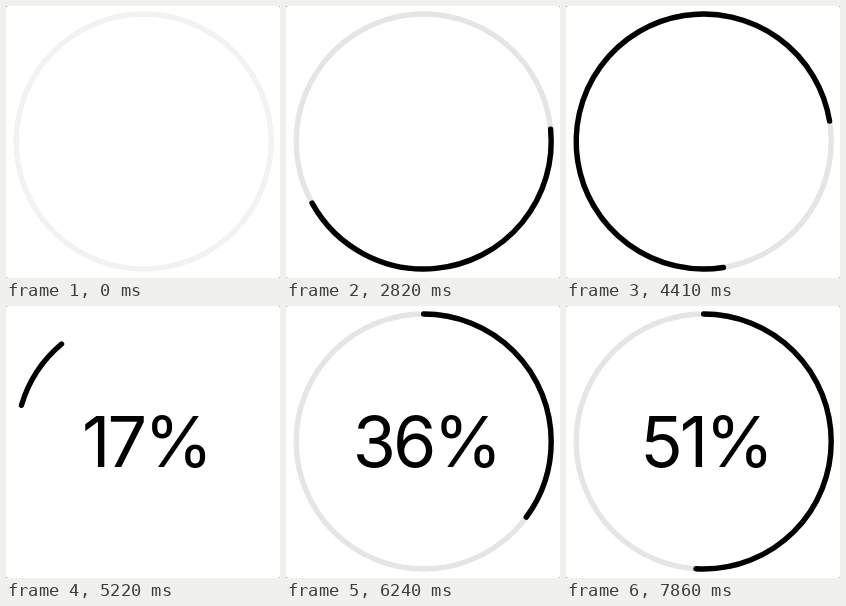
An HTML page that plays this animation: 274 px wide and 272 px high, repeating every 8 s.

```html
<!DOCTYPE html>
<html lang="en">
<head>
<meta charset="utf-8">
<title>Progress ring</title>
<style>
  html, body { margin: 0; width: 100%; height: 100%; overflow: hidden; background: #aaa; }
  svg { display: block; width: 274px; height: 272px; }
  circle { fill: none; stroke-width: 5.4; stroke-linecap: round; }
  text { font: 380 70px Inter, Roboto, sans-serif; letter-spacing: -3px; text-anchor: middle; }
</style>
</head>
<body>
<svg viewBox="0 0 274 272">
  <rect width="274" height="272" rx="2.5" fill="#fff"/>
  <circle id="track" cx="137.7" cy="135.5" r="127.5"/>
  <circle id="arc" cx="137.7" cy="135.5" r="127.5" stroke="#000" pathLength="360"/>
  <text id="label" x="140" y="161"></text>
</svg>
<script>
  const LOOP = 8000, SPIN_START = 1270, SPIN_END = 5370, COUNT_START = 4626;
  const [track, arc, label] = ["track", "arc", "label"].map(id => document.getElementById(id));

  const clamp = x => Math.min(1, Math.max(0, x));
  const mix = (a, b, k) => a + (b - a) * k;
  // Rises from 0 at `start` towards `limit`, ever more slowly.
  const settle = (t, start, limit, tau) => limit * (1 - Math.exp(-(t - start) / tau));
  const fill = t => 3.6 * settle(t, 5310, 54, 886);

  // Turning poses: [ms, start angle, sweep], in degrees clockwise from the top.
  const poses = [
    [SPIN_START, 0, 0], [1740, 185, 110], [2820, 804, 156.5],
    [4410, 1610.5, 270], [5220, 2086, 33.5], [SPIN_END, 2160, fill(SPIN_END)]
  ];

  function arcAt(t) {
    if (t >= SPIN_END) return [0, fill(t)];
    const i = poses.findIndex(p => p[0] > t);
    const [t0, ...a] = poses[i - 1], [t1, ...b] = poses[i];
    return a.map((v, j) => mix(v, b[j], (t - t0) / (t1 - t0)));
  }

  function draw(t) {
    // The track darkens during the first turns and blinks out at the handover.
    const base = mix(242, 229, clamp((t - 1740) / 1080));
    const g = Math.round(mix(255, base, clamp(Math.abs(t - 5220) / 90)));
    track.setAttribute("stroke", `rgb(${g},${g},${g})`);

    const spinning = t > SPIN_START;
    arc.style.display = spinning ? "" : "none";
    if (spinning) {
      const [start, sweep] = arcAt(t);
      arc.setAttribute("transform", `rotate(${start - 90} 137.7 135.5)`);
      arc.setAttribute("stroke-dasharray", `${sweep} 360`);
    }

    label.textContent = t < COUNT_START ? "" : Math.round(settle(t, COUNT_START, 61.6, 1838)) + "%";
  }

  function frame() {
    draw(performance.now() % LOOP);
    requestAnimationFrame(frame);
  }
  frame();
</script>
</body>
</html>
```
